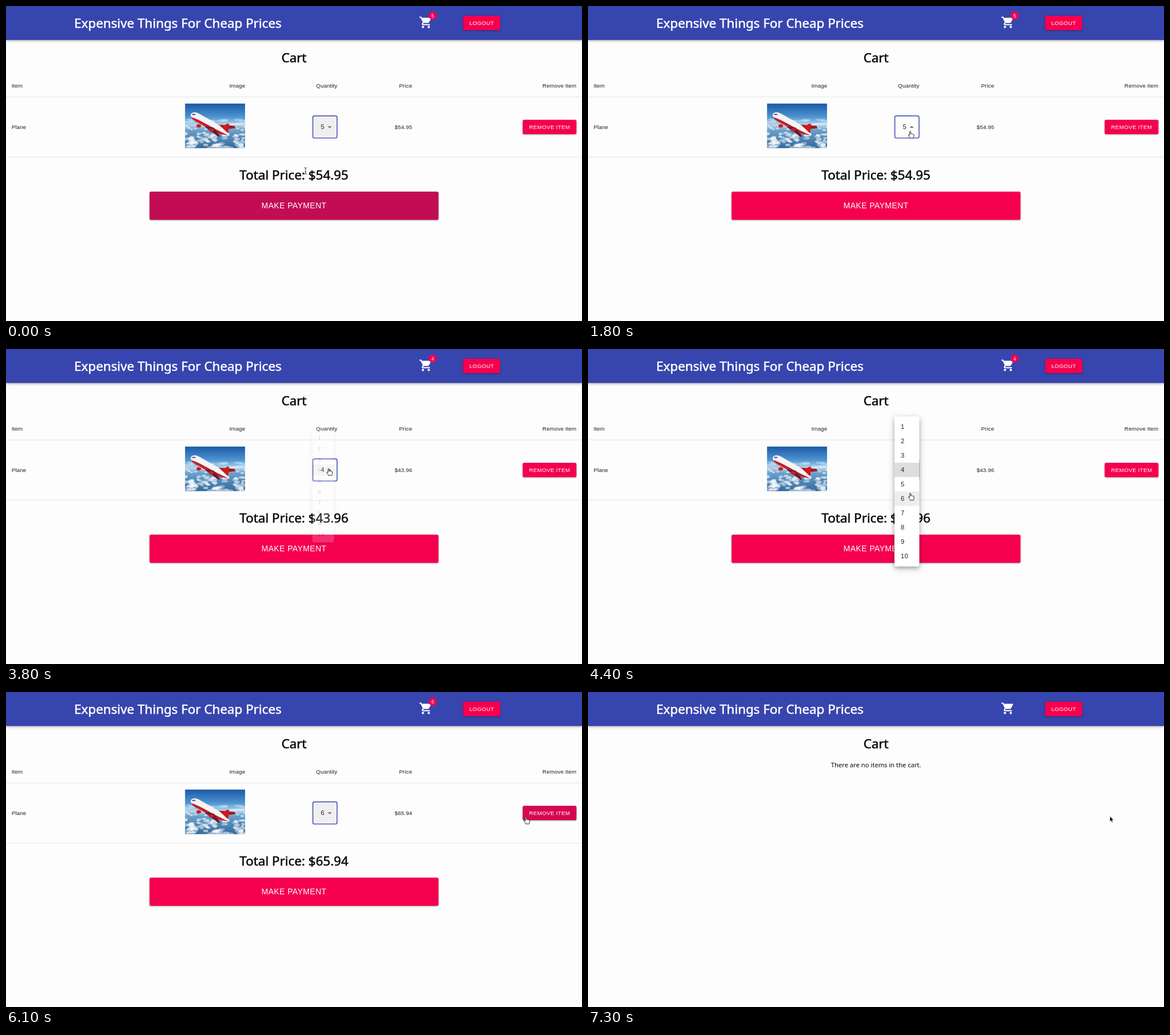
An HTML page that plays this animation: 1000 px wide and 548 px high, repeating every 7.4 s.

```html
<!DOCTYPE html>
<html lang="en">
<head>
<meta charset="utf-8">
<title>Cart</title>
<style>
  html, body { margin: 0; width: 100%; height: 100%; overflow: hidden; background: #fdfdfd; }
  svg { display: block; width: 100vw; height: 100vh; }
  text { font: 9.72px "Liberation Sans", Arial, sans-serif; letter-spacing: .0107em; fill: #212121; }
  .head { font: 22.22px "Noto Sans", "Open Sans", sans-serif; letter-spacing: 0; fill: #0a0a0a; stroke: #0a0a0a; stroke-width: .55px; }
  .title { fill: #fff; stroke: #fff; }
  .note { font: 11.11px "Noto Sans", "Open Sans", sans-serif; letter-spacing: 0; fill: #0a0a0a; }
  .opt { font-size: 11.11px; letter-spacing: .0094em; }
  .label { fill: #fff; letter-spacing: .0286em; }
  .big { font-size: 13.89px; }
  .count { font-size: 8.33px; fill: #fff; letter-spacing: 0; }
  .mid { text-anchor: middle; }
  .end { text-anchor: end; }
  .bar { fill: #3745ae; filter: drop-shadow(0 1.4px 1.6px rgba(0,0,0,.3)) drop-shadow(0 1px 3px rgba(0,0,0,.18)); }
  .btn { fill: #f5004f; filter: drop-shadow(0 1.2px 1px rgba(0,0,0,.26)) drop-shadow(0 .7px 1.6px rgba(0,0,0,.16)); }
  .paper { fill: #fff; filter: drop-shadow(0 3px 3px rgba(0,0,0,.22)) drop-shadow(0 3px 6px rgba(0,0,0,.2)); }
  .line { fill: #e0e0e0; }
</style>
</head>
<body>
<svg viewBox="0 0 1000 548">
  <defs>
    <linearGradient id="sky" x2="0" y2="1">
      <stop offset="0" stop-color="#1b59a6"/>
      <stop offset=".3" stop-color="#4d94d2"/>
      <stop offset=".48" stop-color="#b4d5ec"/>
      <stop offset=".6" stop-color="#6a9fcb"/>
      <stop offset="1" stop-color="#33699d"/>
    </linearGradient>
    <clipPath id="photoClip"><rect width="104.6" height="78"/></clipPath>
    <clipPath id="removeClip"><rect x="897" y="198" width="93.3" height="25" rx="2.8"/></clipPath>
    <clipPath id="rowClip"><rect y="-12.5" width="43.3" height="25"/></clipPath>
  </defs>

  <rect class="bar" width="1000" height="59"/>
  <text class="head title" x="118.4" y="38">Expensive Things For Cheap Prices</text>
  <path transform="translate(716.8 16.4) scale(1.01)" fill="#fff" d="M7 18c-1.1 0-1.99.9-1.99 2S5.9 22 7 22s2-.9 2-2-.9-2-2-2zM1 2v2h2l3.6 7.59-1.35 2.45c-.16.28-.25.61-.25.96 0 1.1.9 2 2 2h12v-2H7.42c-.14 0-.25-.11-.25-.25l.03-.12.9-1.63h7.45c.75 0 1.41-.41 1.75-1.03l3.58-6.49c.08-.14.12-.31.12-.48 0-.55-.45-1-1-1H5.21l-.94-2H1zm16 16c-1.1 0-1.99.9-1.99 2s.89 2 1.99 2 2-.9 2-2-.9-2-2-2z"/>
  <g id="badge">
    <circle r="7" fill="#f5004f"/>
    <text id="count" class="count mid" y="3"></text>
  </g>
  <rect class="btn" x="793.5" y="17" width="64.5" height="25" rx="2.8"/>
  <text class="label mid" x="825.8" y="33">LOGOUT</text>

  <text class="head mid" x="500" y="98">Cart</text>
  <text id="empty" class="note mid" x="500" y="130.8">There are no items in the cart.</text>

  <g id="cart">
    <text x="9.7" y="142">Item</text>
    <text class="end" x="415.3" y="142">Image</text>
    <text class="end" x="575.3" y="142">Quantity</text>
    <text class="end" x="705.2" y="142">Price</text>
    <text class="end" x="990.3" y="142">Remove Item</text>
    <rect class="line" y="157.6" width="1000" height=".9"/>

    <text x="9.7" y="214">Plane</text>
    <g transform="translate(310.6 169.5)" clip-path="url(#photoClip)">
      <rect width="104.6" height="78" fill="url(#sky)"/>
      <g id="clouds" fill="#fff"></g>
      <path d="M38 33L12 37 11 39 42 41Z" fill="#c9ced8"/>
      <path d="M46 36L86 39 88 43 80 44 52 46Z" fill="#a11a22"/>
      <path d="M62 42L74 35 77 36 75 52Z" fill="#d0191f"/>
      <path d="M10 20C11 15 18 14 25 18L60 38 78 55 74 57 56 51 24 33C16 29 10 25 10 20Z" fill="#f4f4f6"/>
      <path d="M11 24C20 26 38 36 52 44L76 56 56 52 24 34C16 30 12 27 11 24Z" fill="#c4202a"/>
      <path d="M34 40L58 58 61 57 50 42Z" fill="#6d1a22"/>
      <ellipse cx="24" cy="39" rx="4" ry="3" fill="#c4202a"/>
      <ellipse cx="46" cy="46" rx="4.5" ry="3" fill="#c4202a"/>
      <path d="M12 18.5L17 18 19 20 13 20Z" fill="#39425a"/>
    </g>
    <rect id="select" x="532.7" y="191.2" width="42" height="38.4" rx="2.4" stroke="#3745ae" stroke-width="1.4"/>
    <text id="value" class="opt" x="546.4" y="214"></text>
    <path id="caret" d="M-3.6-1.8H3.6L0 1.8Z" fill="#757575"/>
    <text id="price" class="end" x="705.2" y="214"></text>
    <rect id="remove" class="btn" x="897" y="198" width="93.3" height="25" rx="2.8"/>
    <g clip-path="url(#removeClip)"><circle id="splash" cx="903" cy="217" fill="#fff"/></g>
    <text class="label mid" x="943.8" y="214">REMOVE ITEM</text>
    <rect class="line" y="262.6" width="1000" height=".9"/>

    <text id="total" class="head mid" x="500" y="302"></text>
    <rect id="pay" class="btn" x="249.3" y="323" width="501.5" height="49" rx="2.8"/>
    <text class="label big mid" x="500" y="352">MAKE PAYMENT</text>
  </g>

  <g id="menu">
    <rect class="paper" y="-18" width="43.3" height="261" rx="2.8"/>
    <rect id="picked" width="43.3" height="25" fill-opacity=".13"/>
    <rect id="hover" width="43.3" height="25" fill-opacity=".07"/>
    <g id="rippleRow" clip-path="url(#rowClip)"><circle id="ripple" cx="28" fill-opacity=".25"/></g>
    <g id="options"></g>
  </g>

  <g id="ibeam" fill="none" stroke="#fff" stroke-width="1.8">
    <path id="beam" d="M-2.6-5.6Q0-5.6 0-4.2Q0-5.6 2.6-5.6M0-4.4V4.4M-2.6 5.6Q0 5.6 0 4.2Q0 5.6 2.6 5.6M-1.2 1.6H1.2"/>
    <use href="#beam" stroke="#222" stroke-width=".9"/>
  </g>
  <path id="arrow" d="M0 0V9.6L2.1 7.7 3.6 11.2 5.2 10.5 3.7 7.1H6.6Z" fill="#000" stroke="#fff" stroke-width=".7"/>
  <path id="hand" d="M-.9.9C-.9-.4 1-.4 1 .9V4.4C1.3 3.6 2.9 3.7 3 4.8C3.4 4.2 4.8 4.4 4.9 5.4C5.4 4.9 6.6 5.2 6.6 6.2V8.6C6.6 10 5.6 10.6 5.6 12H-.2C-.4 10.4-2 9-2.9 7.2C-3.5 6-2.1 5.3-1.4 6.2L-.9 6.9Z" fill="#fff" stroke="#111" stroke-width=".9" stroke-linejoin="round"/>
</svg>

<script>
const LOOP = 7400, ROW = 25, MID = 210.3, GROW = 330, UNIT_PRICE = 10.99;
const el = {};
document.querySelectorAll('svg [id]').forEach(node => el[node.id] = node);

// time, x, y of the pointer's hot spot
const path = [
  [0, 520, 287], [150, 520, 287], [900, 556, 226], [1500, 559.3, 218], [1950, 559.3, 218],
  [2600, 560, 186], [3150, 560, 186], [3600, 560, 208], [3950, 560, 208], [4500, 559.5, 255],
  [5300, 559.5, 255], [6080, 902.5, 217.5], [6600, 902.5, 217.5], [7000, 906, 216]
];
const menus = [
  { open: 1800, press: 2900, close: 3050, row: 4, hit: 3 },
  { open: 3727, press: 4754, close: 4904, row: 3, hit: 5 }
];
const badgeMoves = [[3155, 0], [3450, 1], [5010, 0], [5420, 1], [6690, 0]];
const REMOVED = 6800, REMOVE_HOVER = 6000, REMOVE_PRESS = 6500;

const clamp = v => Math.min(1, Math.max(0, v));
const mix = (a, b, k) => a + (b - a) * k;
const set = (node, attrs) => { for (const k in attrs) node.setAttribute(k, attrs[k]); };
const show = (node, on) => node.style.display = on ? '' : 'none';

// cubic-bezier(.4, 0, .2, 1)
function ease(x) {
  x = clamp(x);
  let lo = 0, hi = 1;
  for (let i = 0; i < 20; i++) {
    const u = (lo + hi) / 2, v = 1 - u;
    if (1.2 * u * v * v + .6 * u * u * v + u * u * u < x) lo = u; else hi = u;
  }
  return lo * lo * (3 - 2 * lo);
}

function pinkShade(k) {
  return `rgb(${mix(245, 194, k)},${mix(0, 12, k)},${mix(79, 83, k)})`;
}

function pointer(t) {
  const i = path.findIndex(p => p[0] > t);
  if (i < 0) return path[path.length - 1].slice(1);
  const [t0, x0, y0] = path[i - 1], [t1, x1, y1] = path[i];
  const u = (t - t0) / (t1 - t0), k = u * u * (3 - 2 * u);
  return [mix(x0, x1, k), mix(y0, y1, k)];
}

function badgeScale(t) {
  let scale = 1;
  for (const [start, to] of badgeMoves)
    if (t >= start) scale = mix(1 - to, to, ease((t - start) / (to ? 225 : 195)));
  return scale;
}

function drawMenu(t, y) {
  const m = menus.find(m => t > m.open && t < m.close + GROW);
  show(el.menu, m);
  if (!m) return;
  const closing = t >= m.close;
  const age = closing ? t - m.close : t - m.open;
  const fade = ease(age / GROW);
  const move = ease((closing ? age - GROW / 3 : age) / (GROW * 2 / 3));
  const s = mix(.75, 1, closing ? 1 - move : move);
  const over = closing ? m.hit : Math.round((y - MID) / ROW) + m.row;
  set(el.menu, {
    opacity: closing ? 1 - fade : fade,
    transform: `translate(532 ${MID}) scale(${s} ${s * s}) translate(0 ${-m.row * ROW})`
  });
  set(el.picked, { y: (m.row - .5) * ROW });
  set(el.hover, { y: (over - .5) * ROW });
  set(el.rippleRow, { transform: `translate(0 ${m.hit * ROW})` });
  set(el.ripple, { r: 32 * ease((t - m.press) / 550) });
}

function drawPointer(t, x, y, menuOpen) {
  const inSelect = x > 532 && x < 575 && y < 230 && y > 191;
  const onRemove = x > 897 && t < 7300;
  const kind = menuOpen || inSelect || onRemove ? 'hand' : y > 278 ? 'ibeam' : 'arrow';
  for (const id of ['hand', 'ibeam', 'arrow']) show(el[id], id === kind);
  set(el[kind], { transform: `translate(${x} ${y})` });
}

function draw(t) {
  const [x, y] = pointer(t);
  const qty = t < 3450 ? 5 : t < 5420 ? 4 : 6;
  const cost = '$' + (qty * UNIT_PRICE).toFixed(2);
  const menuOpen = menus.some(m => t >= m.open - 60 && t < m.close);
  const filled = t < REMOVED;

  show(el.cart, filled);
  show(el.empty, !filled);
  el.value.textContent = el.count.textContent = qty;
  el.price.textContent = cost;
  el.total.textContent = 'Total Price: ' + cost;
  set(el.badge, { transform: `translate(740.8 16.8) scale(${badgeScale(t)})` });
  set(el.select, { fill: menuOpen ? '#fdfdfd' : '#efeff0' });
  set(el.caret, { transform: `translate(562 ${menuOpen ? 210.2 : 211}) scale(1 ${menuOpen ? -1 : 1})` });

  el.pay.style.fill = pinkShade(1 - ease(t / 250));
  el.remove.style.fill = pinkShade(ease((t - REMOVE_HOVER) / 250));
  set(el.splash, { r: 95 * ease((t - REMOVE_PRESS) / 550), 'fill-opacity': .3 });

  drawMenu(t, y);
  drawPointer(t, x, y, menuOpen || menus.some(m => t >= m.close && t < m.close + GROW));
}

function build() {
  let seed = 11;
  const rnd = () => (seed = seed * 16807 % 2147483647) / 2147483647;
  let puffs = '';
  for (let i = 0; i < 90; i++) {
    const d = rnd(), r = 1.5 + 4 * d * rnd();
    puffs += `<ellipse cx="${rnd() * 105}" cy="${40 + d * 38}" rx="${r * 1.6}" ry="${r * .8}" opacity="${.35 + rnd() * .4}"/>`;
  }
  for (let i = 0; i < 14; i++)
    puffs += `<ellipse cx="${rnd() * 105}" cy="${28 + rnd() * 10}" rx="${5 + rnd() * 7}" ry="2" opacity=".3"/>`;
  el.clouds.innerHTML = puffs;

  for (let i = 0; i < 10; i++)
    el.options.innerHTML += `<text class="opt" x="11.1" y="${i * ROW + 4}">${i + 1}</text>`;
}

build();
const start = performance.now();
function tick() {
  draw((performance.now() - start) % LOOP);
  requestAnimationFrame(tick);
}
tick();
</script>
</body>
</html>
```
